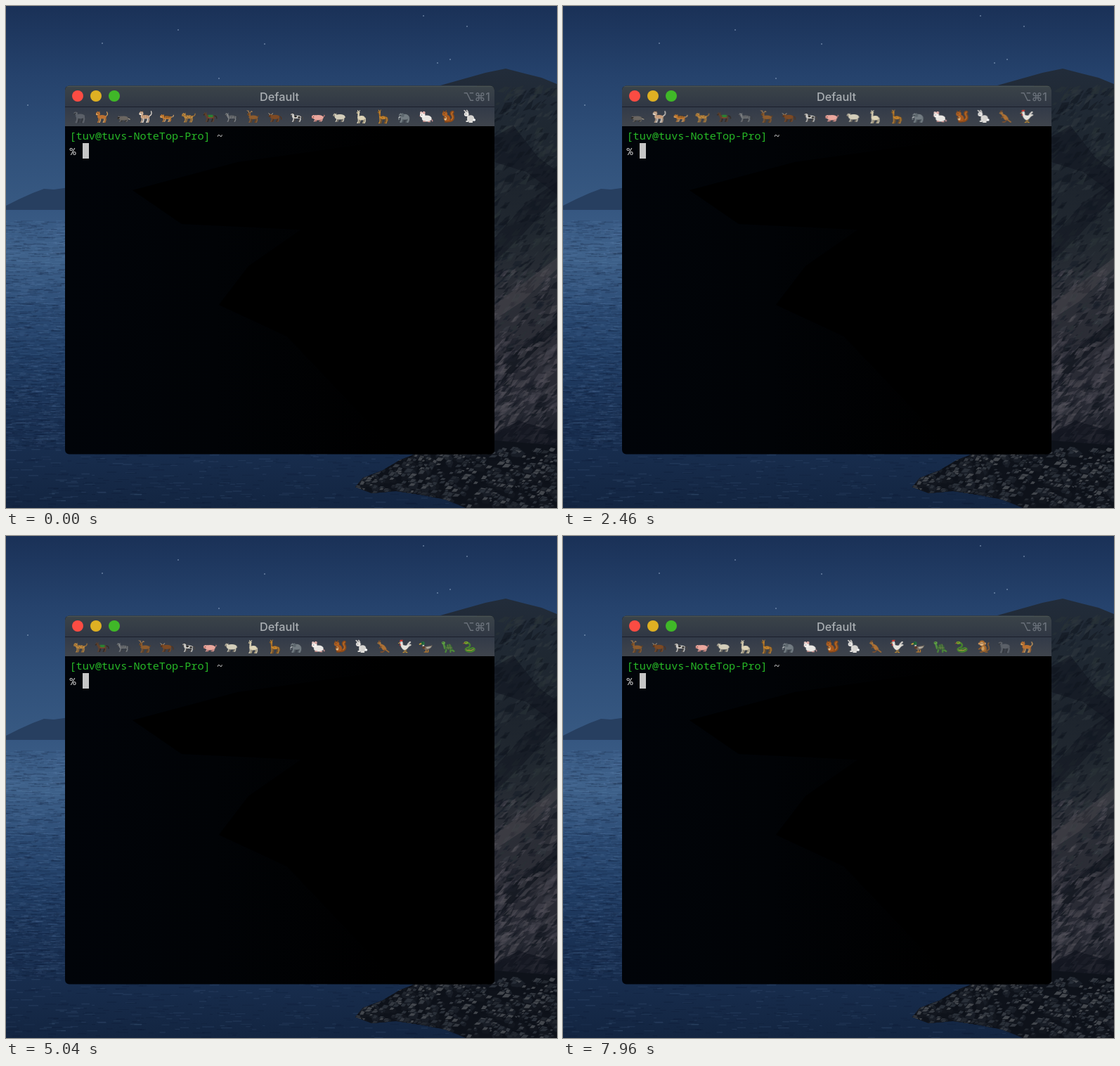
Recreate the animation shown at these times as an HTML page with a canvas. Size 784 by 714 pixels, loop 8 s.

```html
<!DOCTYPE html>
<html lang="en">
<head>
<meta charset="utf-8">
<title>Terminal with a parade of animals</title>
<style>
html, body { margin: 0; width: 100%; height: 100%; overflow: hidden; background: #1c3358; }
canvas, svg { position: absolute; left: 0; top: 0; display: block; }
.title { font: 500 16.3px Inter, Roboto, sans-serif; fill: #a9aeb2; }
.keys { font: 500 16px Inter, "DejaVu Sans", sans-serif; fill: #6a717a; }
.term { font: 15.17px "Noto Sans Mono", "DejaVu Sans Mono", monospace; white-space: pre; }
#parade { --w: 30.78px; animation: parade 8s step-end infinite; }
@keyframes parade {
  0% { transform: translateX(0); }
  8.875% { transform: translateX(calc(var(--w) * -1)); }
  21.375% { transform: translateX(calc(var(--w) * -2)); }
  33.875% { transform: translateX(calc(var(--w) * -3)); }
  46.375% { transform: translateX(calc(var(--w) * -4)); }
  58.875% { transform: translateX(calc(var(--w) * -5)); }
  71.375% { transform: translateX(calc(var(--w) * -6)); }
  83.875% { transform: translateX(calc(var(--w) * -7)); }
  96.375%, 100% { transform: translateX(calc(var(--w) * -8)); }
}
</style>
</head>
<body>
<canvas id="scene" width="784" height="714"></canvas>
<svg width="784" height="714" viewBox="0 0 784 714">
  <defs>
    <linearGradient id="bar" x2="0" y2="1"><stop stop-color="#3b4449"/><stop offset="1" stop-color="#303744"/></linearGradient>
    <linearGradient id="status" x2="0" y2="1"><stop stop-color="#323a48"/><stop offset="1" stop-color="#3f444c"/></linearGradient>
    <linearGradient id="glass"><stop stop-color="#010409"/><stop offset=".35" stop-color="#010306"/><stop offset=".75" stop-color="#000"/></linearGradient>
    <clipPath id="frame"><rect x="84" y="113.5" width="611" height="524" rx="6"/></clipPath>
    <clipPath id="slots"><rect x="89.6" y="144" width="584.8" height="27"/></clipPath>
  </defs>
  <g clip-path="url(#frame)">
    <rect x="84" y="113" width="611" height="525" fill="url(#glass)"/>
    <path d="M180 262L330 222L560 190L695 171V638H560L400 470L303 425L345 370L420 318L250 310Z" fill="#000"/>
    <rect x="84" y="113" width="611" height="30" fill="url(#bar)"/>
    <path d="M84 114H695" stroke="#59625f"/>
    <rect x="84" y="143" width="611" height="28" fill="url(#status)"/>
    <path d="M84 143.5H695" stroke="#1b1f2b"/>
  </g>
  <circle cx="102" cy="128" r="8" fill="#fb4c43"/>
  <circle cx="128" cy="128" r="8" fill="#deb023"/>
  <circle cx="154" cy="128" r="8" fill="#40b828"/>
  <text class="title" x="389" y="134.5" text-anchor="middle">Default</text>
  <text class="keys" x="689" y="134.5" text-anchor="end">⌥⌘1</text>
  <g clip-path="url(#slots)"><g id="parade"></g></g>
  <text class="term" x="90.5" y="190" fill="#27b927">[tuv@tuvs-NoteTop-Pro]<tspan fill="#c9c9c9"> ~</tspan></text>
  <text class="term" x="90.5" y="212" fill="#d0d0d0">%</text>
  <rect x="109" y="195" width="9" height="22" fill="#c6c6c6"/>
</svg>
<script>
const STEP = 30.78, VISIBLE = 19, SHIFTS = 8;

const oval = (x, y, rx, ry, fill) => `<ellipse cx="${x}" cy="${y}" rx="${rx}" ry="${ry}" fill="${fill}"/>`;
const line = (d, color, width = 1) =>
  `<path d="${d}" fill="none" stroke="${color}" stroke-width="${width}" stroke-linecap="round" stroke-linejoin="round"/>`;
const shape = (d, fill) => `<path d="${d}" fill="${fill}"/>`;
const eye = (x, y) => oval(x, y, .5, .5, '#111');

// A four-legged animal that looks left, centred on 0,0.
function beast(color, { dark = color, rx = 6.5, ry = 2.7, y = 0, hx = -6.5, hy = -3.5, hr = 2.4, neck = 2.8,
                        leg = 1.4, foot = 7.5, tail = 'q4 0 3.5 5', ears = color, tall = .86, extra = '' } = {}) {
  const legs = (x, tone) => line(`M${x} ${y}l.5 4L${x - .6} ${foot}h-.6`, tone, leg);
  const body = line(`M${rx - 1} ${y - 1}${tail}`, dark, 1.2)
    + legs(-2.6, dark) + legs(3, dark)
    + oval(0, y, rx, ry, color)
    + legs(-4.8, color) + legs(5, color)
    + line(`M-4.5 ${y - .5}L${hx + .5} ${hy}`, color, neck)
    + line(`M${hx - .4} ${hy - 1.3}l-.4 -1.5M${hx + 1.4} ${hy - 1.3}l.6 -1.5`, ears, 1)
    + oval(hx, hy, hr, hr * .85, color)
    + oval(hx - 1.6, hy + 1, hr * .5, hr * .4, dark)
    + eye(hx - .5, hy - .3) + extra;
  return `<g transform="translate(.5 .8) scale(1 ${tall})">${body}</g>`;
}

const stripes = c => line('M-3.5 -2l.5 3M-1 -2.5l.4 4M1.6 -2.5l.3 4M4 -2l.4 3', c, .8);
const spots = c => ['-3 -1', '-1 1', '0 -2', '2.5 0', '4 -1.5', '-5 -2'].map(p => line(`M${p}h.3`, c, .9)).join('');

const animals = [
  beast('#5b6068', { dark: '#33373e', ry: 3.4, y: -1, hy: -5, hr: 2.8, leg: 2.4, tail: 'h0', ears: '#373b43', tall: 1 }),
  beast('#bd7231', { dark: '#d9a25c', hx: -5.5, hy: -4.8, hr: 3, tail: 'q4 -2 1.5 -6', tall: 1 }),
  beast('#6b6661', { dark: '#37352f', ry: 3.6, y: 2, hx: -6, hy: 1.5, hr: 2.7, tail: 'q3 1 4 3',
    extra: line('M-8 1h2', '#24211f', 1.3) + line('M7 3l2 1', '#aaa296', 1.4) }),
  beast('#d0b094', { dark: '#efe6db', hx: -5.5, hy: -5, hr: 3, tail: 'q5 -2 3 -7', ears: '#b8743a', tall: 1,
    extra: stripes('#b07042') }),
  beast('#c87d30', { dark: '#d8a76f', y: 1, hy: -1, hr: 3, tail: 'q4 1 4 -3', extra: stripes('#40260f') }),
  beast('#bd8940', { dark: '#a97635', hy: -3, hr: 2.8, tail: 'q4 0 4 -4', tall: .95, extra: spots('#503317') }),
  beast('#60422c', { dark: '#33261d', hx: -7, hy: -4.5, hr: 2.2, y: -.5, tail: 'q4 -1 4 4',
    extra: shape('M-3 -3.5H4V1H-2Z', '#2b8133') + line('M-3 1.5H4', '#a6382b') }),
  beast('#7d8083', { dark: '#3b3e43', hx: -7, hy: -3.5, extra: stripes('#24272c') }),
  beast('#8e5c2d', { dark: '#69421d', hx: -6, hy: -4, hr: 2.2, y: .5, tail: 'l2 -1', tall: 1,
    extra: line('M-6 -6l-1 -3M-7 -8l-2 -1M-4.5 -6l2 -2.5M-3.5 -7.5l2 0', '#b08654', .9) }),
  beast('#7d4a24', { dark: '#573218', ry: 3.6, hx: -6, hy: -2, hr: 2.7, neck: 4,
    extra: line('M-7 -4l-2 -2M-5 -4l2 -2', '#b8aa8f') }),
  beast('#d2d0cb', { dark: '#4a4644', hx: -6, hy: -3.5, ears: '#302d2b',
    extra: oval(-1.5, -.8, 2, 1.7, '#292725') + oval(3.5, .5, 1.7, 1.5, '#292725') }),
  beast('#eba79d', { dark: '#cf837b', rx: 7.5, ry: 4.4, y: 1, hx: -6, hy: 0, hr: 3.4, foot: 7, tail: 'q3 -1 2 -3' }),
  beast('#d4ceba', { dark: '#82796a', rx: 7.5, ry: 4.4, hx: -7, hy: -3, hr: 2.6, tail: 'l1 2', ears: '#9d927f' }),
  beast('#ded4b7', { dark: '#bfb08a', rx: 4.6, ry: 3.3, y: 1.5, hx: -4.5, hy: -6.5, hr: 2, neck: 2.4,
    foot: 8.5, tail: 'l2 2', tall: 1 }),
  beast('#c5842c', { dark: '#83551f', rx: 4, ry: 2.4, y: 1, hx: -5.5, hy: -7, hr: 1.8, neck: 2.2, foot: 8.7, tall: 1,
    extra: spots('#774515') + line('M-4.5 -4v.3M-4 -2v.3', '#774515') }),
  beast('#737c82', { dark: '#4b545b', rx: 6, ry: 4.2, hx: -5, hy: -2.5, hr: 3.4, leg: 2.4, tail: 'l2 3', tall: .95,
    extra: oval(-2.8, -2.5, 2, 2.8, '#5c666d') + line('M-7.5 -1q-1 3 -1 5', '#737c82', 1.6) + line('M-6.5 0l-2 1', '#ddd') }),
  line('M5 5q5 -1 4 2', '#d59a9a', 1.2) + oval(1, 3, 7, 4.6, '#e9e7e3') + oval(-5, -2, 3.8, 3.8, '#f4f2ef')
    + oval(-3, -5.3, 2, 2, '#dba9a5') + oval(-7, -5.3, 1.6, 1.8, '#e7c8c3') + eye(-6, -2)
    + line('M-4 7h3M3 7.5h3', '#d89d98', 1.3) + oval(-8.6, -.6, .7, .7, '#d58783'),
  line('M3 6q6 -1 4 -7q-3 -4 0 -5', '#8f4a16', 4.4) + line('M5 5q4 -3 1 -7q-1 -3 1 -4', '#bd7430', 1.2)
    + oval(-1, 3, 4.6, 5, '#a9581d') + oval(-4, -3.5, 3.7, 3.2, '#af6022') + line('M-3 -6l1 -2M-6 -6v-1.5', '#8a4918', 1.4)
    + oval(-3.2, 3, 1.8, 2.8, '#e0bf8d') + eye(-5.2, -4) + line('M-4 8h5M-3 2l-3 0', '#7e4216', 1.5),
  oval(2, 3, 5, 4.8, '#d6d4d1') + oval(7, 5, 1.8, 1.8, '#fff') + line('M-2 -6l-1.5 -2.5M-4.5 -6l-2.6 -2.3', '#cbc8c5', 1.8)
    + oval(-4, -3, 3.4, 3, '#e8e6e4') + line('M-2 0l0 7h-2M4 8h-4', '#e2e0dd', 1.9) + eye(-5, -3.3),
  line('M3 4q4 3 5.5 4', '#a16a30', 1.7) + shape('M-4 -4Q3 -3 5.5 4Q3.5 6 0 5Q-3 1 -5 -3Z', '#ad7134')
    + oval(-5, -4.8, 2.4, 1.8, '#b17b3d') + line('M-4.2 -6.2l.5 -2M-5.7 -6.4l0 -1.6', '#85522a', 1.1)
    + line('M3 5l-3 3h-3M-2 0l-2.5 2', '#85522a', 1.4) + eye(-5.6, -5),
  line('M4 0q1 -4 4 -6M4 1q3 -3 4.5 -3', '#cfccc7', 2.4) + shape('M-6 -6Q-2 -8 -2 -2Q3 0 7 -3Q5 5 0 5.5Q-6 3 -6 -6Z', '#e6e3dd')
    + oval(-4.5, -5.5, 2, 2.2, '#ece9e4') + line('M-6 -7.6l1 -1l1 1l1 -1', '#d63a31', 1.5)
    + line('M-6 -3v1.5', '#d63a31', 1.4) + line('M-7 -5l-1.4 .5M0 6v2.6h-2M2 5v3.6h2', '#d99c32', 1) + eye(-5, -6),
  shape('M-4 0Q4 0 9 -2Q7 5 0 5Q-6 4 -4 0Z', '#746a5e') + shape('M0 1L8 0Q5 4 1 3Z', '#b5b0a5')
    + line('M-3.8 -2.5v2.5', '#dcd9d2', 2.4) + oval(-4.5, -4.5, 2.7, 2.6, '#236c40') + oval(-3.4, 1.6, 2, 2.2, '#5f3b29')
    + line('M-7.2 -4l-2 1', '#deb139', 1.6) + line('M0 5v3h-2.5M3 5v3h-2', '#d0862c', 1.2) + eye(-5.2, -5),
  line('M-4 3Q-5 -1 -6 -4', '#54933f', 2.6) + oval(-6, -5, 2.6, 2, '#60a346')
    + line('M-2 5l-1 3M4 5v3M6 5l3 2', '#4e8d38', 2.2) + shape('M-4 4Q-3 -3.5 2 -3.5Q7 -2.5 7 5Z', '#386437')
    + line('M-2 2h8M0 -2l1 6M3 -3l1 7', '#76894a', .8) + eye(-6.6, -5.4),
  line('M-5 -5Q0 -6 1 -2Q1 1 -3 2Q-8 4 -3 7Q3 8.5 7 5.5Q8.5 3 5 2L-1 4', '#47862c', 2.3)
    + line('M-4 5Q2 7 6 4', '#c5b23a', 1) + oval(-4.5, -5.2, 3, 2.1, '#779f2e')
    + eye(-5, -5.8) + line('M-7.2 -4.7l-1.5 .7', '#d64a35', .8),
  line('M4 6q6 0 4 -6q-2 -3 0 -5', '#98602a', 1.4) + oval(1, 3, 3.9, 4.9, '#a96a2b') + oval(-.3, 3, 2, 3, '#cc9e60')
    + oval(-5.6, -4, 1.4, 1.6, '#cf9a66') + oval(2.6, -4, 1.5, 1.7, '#cf9a66') + oval(-1.5, -4.5, 3.8, 4, '#a96a2b')
    + oval(-2, -3.5, 2.7, 2.7, '#dbae7a') + eye(-3, -4.4) + eye(-1, -4.4) + line('M-2 1l-4 3M-1 8h-3M3 8h3', '#98602a', 1.6)
];

document.getElementById('parade').innerHTML = Array.from({ length: VISIBLE + SHIFTS }, (_, i) =>
  `<g transform="translate(${(105.2 + i * STEP).toFixed(2)} 157)">${animals[i % animals.length]}</g>`).join('');

const ctx = document.getElementById('scene').getContext('2d');
let seed = 11;
const random = () => (seed = (seed * 16807) % 2147483647) / 2147483647;
const between = (a, b) => a + random() * (b - a);
const pick = list => list[Math.floor(random() * list.length)];

function gradient(y0, y1, colors) {
  const g = ctx.createLinearGradient(0, y0, 0, y1);
  colors.forEach((c, i) => g.addColorStop(i / (colors.length - 1), c));
  return g;
}

function polygon(points, fill) {
  ctx.beginPath();
  points.forEach(([x, y]) => ctx.lineTo(x, y));
  ctx.closePath();
  ctx.fillStyle = fill;
  ctx.fill();
}

// Jagged flecks, denser and finer than the ridges, give the stone its grain.
function flecks(count, [x0, y0, x1, y1], size, colors) {
  for (let i = 0; i < count; i++) {
    const x = between(x0, x1), y = between(y0, y1), s = between(size / 4, size);
    const jitter = () => between(-s, s) * .5;
    polygon([[x - s, y + s * .7 + jitter()], [x + jitter(), y - s * .5], [x + s, y - s * .8 + jitter()], [x + jitter(), y + s * .5]],
      pick(colors));
  }
}

// A boulder: dark block with a lit upper face.
function boulder(x, y, r) {
  const w = r * between(.8, 1.4), h = r * between(.6, 1);
  polygon([[x - w, y], [x - w * .4, y - h], [x + w * .5, y - h * .8], [x + w, y], [x + w * .6, y + h], [x - w * .7, y + h * .8]],
    pick(['#0d1119', '#12161e', '#181d26']));
  polygon([[x - w * .8, y - h * .1], [x - w * .3, y - h * .9], [x + w * .5, y - h * .7], [x + w * .1, y - h * .1]],
    pick(['#343941', '#292f38', '#22272f', '#43474d']));
}

function paintScene() {
  ctx.fillStyle = gradient(0, 290, ['#1a3157', '#25426c', '#2f4f79', '#385a83']);
  ctx.fillRect(0, 0, 784, 290);
  ctx.fillStyle = gradient(284, 714, ['#355680', '#3f628b', '#2d4d76', '#213e65', '#1a3255', '#172c4c', '#132541']);
  ctx.fillRect(0, 284, 784, 430);

  for (let i = 0; i < 2200; i++) {
    const y = between(305, 714);
    ctx.fillStyle = pick(['rgba(120,155,195,.11)', 'rgba(4,14,38,.17)']);
    ctx.fillRect(between(-20, y < 630 ? 84 : 640), y, between(3, 18), between(.7, 1.6));
  }

  polygon([[0, 284], [18, 275], [38, 266], [54, 260], [68, 261], [90, 258], [90, 290], [0, 290]], '#273f60');

  ctx.fillStyle = 'rgba(190,210,235,.7)';
  [[594, 14], [656, 29], [614, 81], [632, 76], [303, 103], [368, 54], [137, 53], [245, 34], [31, 141]]
    .forEach(([x, y]) => ctx.fillRect(x - .7, y - .7, 1.4, 1.4));

  const cliff = [[618, 113], [650, 104], [682, 95], [711, 89], [738, 96], [762, 102], [784, 111],
    [784, 714], [690, 640], [670, 113]];
  ctx.save();
  polygon(cliff, gradient(89, 650, ['#222c3a', '#1f2832', '#1d242d', '#212830', '#2b2e36', '#2c2d36', '#272933', '#181c25']));
  ctx.clip();
  const grass = ['#10161f88', '#30393e77', '#2a343788', '#161d2888'];
  const stone = ['#4d4c5677', '#12161f99', '#3a3c4688', '#1b1f2999', '#5b596066'];
  flecks(380, [690, 115, 784, 390], 9, grass);
  polygon([[695, 186], [722, 170], [757, 215], [784, 235], [784, 268], [740, 236], [695, 222]], '#0d131c77');
  polygon([[695, 330], [740, 280], [784, 250], [784, 272], [735, 325], [695, 365]], '#0d131c77');
  flecks(240, [690, 375, 784, 490], 8, stone.concat(grass));
  polygon([[695, 425], [735, 395], [784, 358], [784, 374], [735, 420], [695, 446]], '#5a565b55');
  polygon([[695, 520], [740, 480], [784, 445], [784, 460], [735, 508], [695, 548]], '#0b0f1899');
  flecks(360, [690, 480, 784, 625], 10, stone);
  polygon([[690, 610], [730, 590], [784, 606], [784, 650], [690, 650]], '#0e121b99');
  ctx.restore();

  ctx.save();
  polygon([[497, 684], [508, 671], [535, 661], [560, 646], [590, 634], [695, 618], [784, 625], [784, 714],
    [655, 714], [625, 702], [590, 695], [555, 690], [520, 693]], '#0e121a');
  ctx.clip();
  for (let i = 0; i < 520; i++) boulder(between(498, 784), 632 + i * .16, between(3, 8));
  ctx.restore();
}

paintScene();
</script>
</body>
</html>
```
